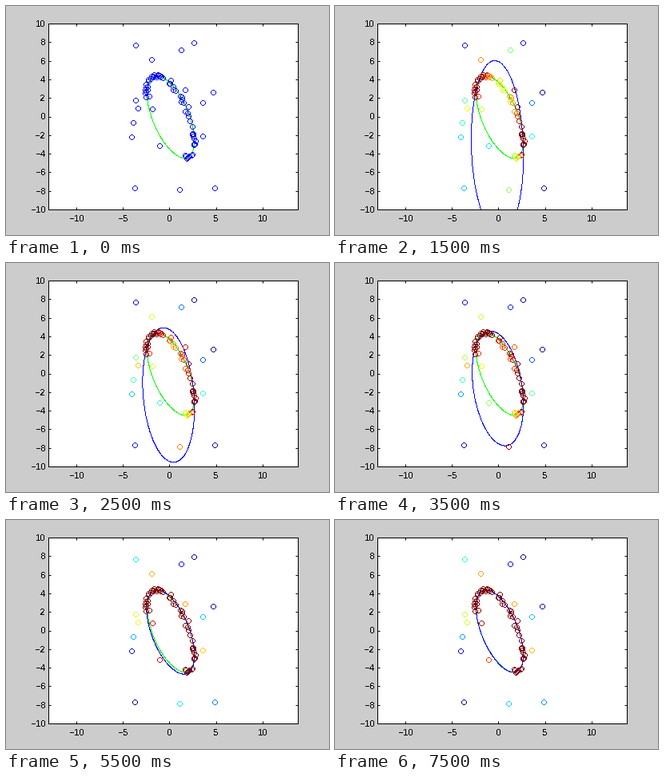
Write a matplotlib script that moves like this. It is 404 px wide and 287 px high and loops after 8000 ms.

```python
import numpy as np
import matplotlib.pyplot as plt
from matplotlib.animation import FuncAnimation

W, H, DPI = 404, 287, 64
PX = 72 / DPI                       # one pixel in points
LEFT, RIGHT, TOP, BOTTOM = 53, 365, 22, 255
X0, Y0, UNIT = 204.5, 138.5, 11.65  # origin and scale of the plot in pixels
FRAMES, INTERVAL = 16, 500
BLUE, GREEN = "#0000ff", "#00ff00"

plt.rcParams.update({
    "font.family": "Liberation Sans",
    "font.size": 11 * PX,
    "text.antialiased": False,
    "text.hinting": "force_autohint",
    "text.hinting_factor": 1,
    "axes.linewidth": PX,
})


def excess(i):
    """How far the fit's lower end still hangs below the true ellipse."""
    if i < 8:
        return min(135, 12 + 84 * 0.75 ** (i - 3))
    return 12 * 0.6 ** (i - 8)


def fit(e):
    """Centre, radii and correlation of the fitted ellipse for an excess e."""
    l, r = 176 - 6.2 * (1 - np.exp(-e / 25)), 235.2
    t, b = 87.4 - 19.4 * (e / 96) ** 2.2, 190 + e
    return (l + r) / 2, (t + b) / 2, (r - l) / 2, (b - t) / 2, 0.58 * np.exp(-e / 54)


def curve(a, cx, cy, rx, ry, rho):
    return np.column_stack([cx + rx * np.cos(a),
                            cy + ry * np.cos(a - np.arccos(rho))])


def outline(e):
    return curve(np.linspace(0, 2 * np.pi, 700), *fit(e))


def weights(e):
    cx, cy, rx, ry, rho = fit(e)
    p, q = (pts[:, 0] - cx) / rx, (pts[:, 1] - cy) / ry
    residual = abs((p * p - 2 * rho * p * q + q * q) / (1 - rho * rho) - 1)
    falloff = 0.85 + 1.65 * np.exp(-e / 20)
    w = np.minimum(1, 1.1 * np.exp(-residual / falloff))
    return np.clip((w - 0.05) / 0.95, 0, 1)


# Samples near the true ellipse: angle, half spread (degrees) and count
arcs = [(-172, 15, 10), (-130, 22, 14), (-86, 10, 6), (-63, 4, 4),
        (-48, 5, 4), (-31, 5, 4), (-2, 11, 9), (40, 12, 9)]
angles = np.radians(np.concatenate(
    [np.linspace(c - s, c + s, n) for c, s, n in arcs]))
rng = np.random.default_rng(4)
inliers = curve(angles, *fit(0)) + rng.normal(0, 1.5, (len(angles), 2))
outliers = [
    (162, 49), (182, 67), (235, 46), (219, 55), (259, 108), (246, 121),
    (246, 163), (224, 105), (162, 118), (165, 128), (159, 146), (157, 164),
    (183, 129), (192, 175), (161, 228), (217, 230), (261, 228),
]
pts = np.vstack([inliers, outliers])

# A ring of 16 pixels around each sample
turn = np.arange(16) * np.pi / 8
ring = np.round(3 * np.column_stack([np.cos(turn), np.sin(turn)]))
rings = (np.round(pts)[:, None] + ring).reshape(-1, 2)


def to_data(xy):
    """Stage pixels to plot units, at the pixel centres."""
    return (np.round(xy) + 0.5 - (X0, Y0)) / (UNIT, -UNIT)


def pixels(xy, color, z):
    return ax.scatter(*to_data(xy).T, s=PX ** 2, marker="s", c=color,
                      edgecolors="none", linewidths=0, antialiased=False,
                      zorder=z)


fig = plt.figure(figsize=(W / DPI, H / DPI), dpi=DPI, facecolor="#cccccc")
ax = fig.add_axes([LEFT / W, (H - BOTTOM) / H,
                   (RIGHT - LEFT) / W, (BOTTOM - TOP) / H])
ax.set_xlim((LEFT - X0) / UNIT, (RIGHT - X0) / UNIT)
ax.set_ylim((Y0 - BOTTOM) / UNIT, (Y0 - TOP) / UNIT)
ax.set_xticks(range(-10, 11, 5))
ax.set_yticks(range(-10, 11, 2))
ax.tick_params(direction="in", top=True, right=True, length=3 * PX, width=PX)
ax.tick_params(axis="x", pad=7 * PX)
ax.tick_params(axis="y", pad=4 * PX)

pixels(outline(0), GREEN, 2)
fit_line = pixels(outline(0), BLUE, 3)
dots = pixels(rings, BLUE, 4)


def update(i):
    fit_line.set_visible(i > 0)
    if i == 0:
        dots.set_facecolor(BLUE)
    else:
        e = excess(i)
        fit_line.set_offsets(to_data(outline(e)))
        dots.set_facecolor(np.repeat(plt.cm.jet(weights(e)), len(ring), axis=0))
    return fit_line, dots


anim = FuncAnimation(fig, update, frames=FRAMES, interval=INTERVAL,
                     repeat=True, repeat_delay=0)
plt.show()
```
